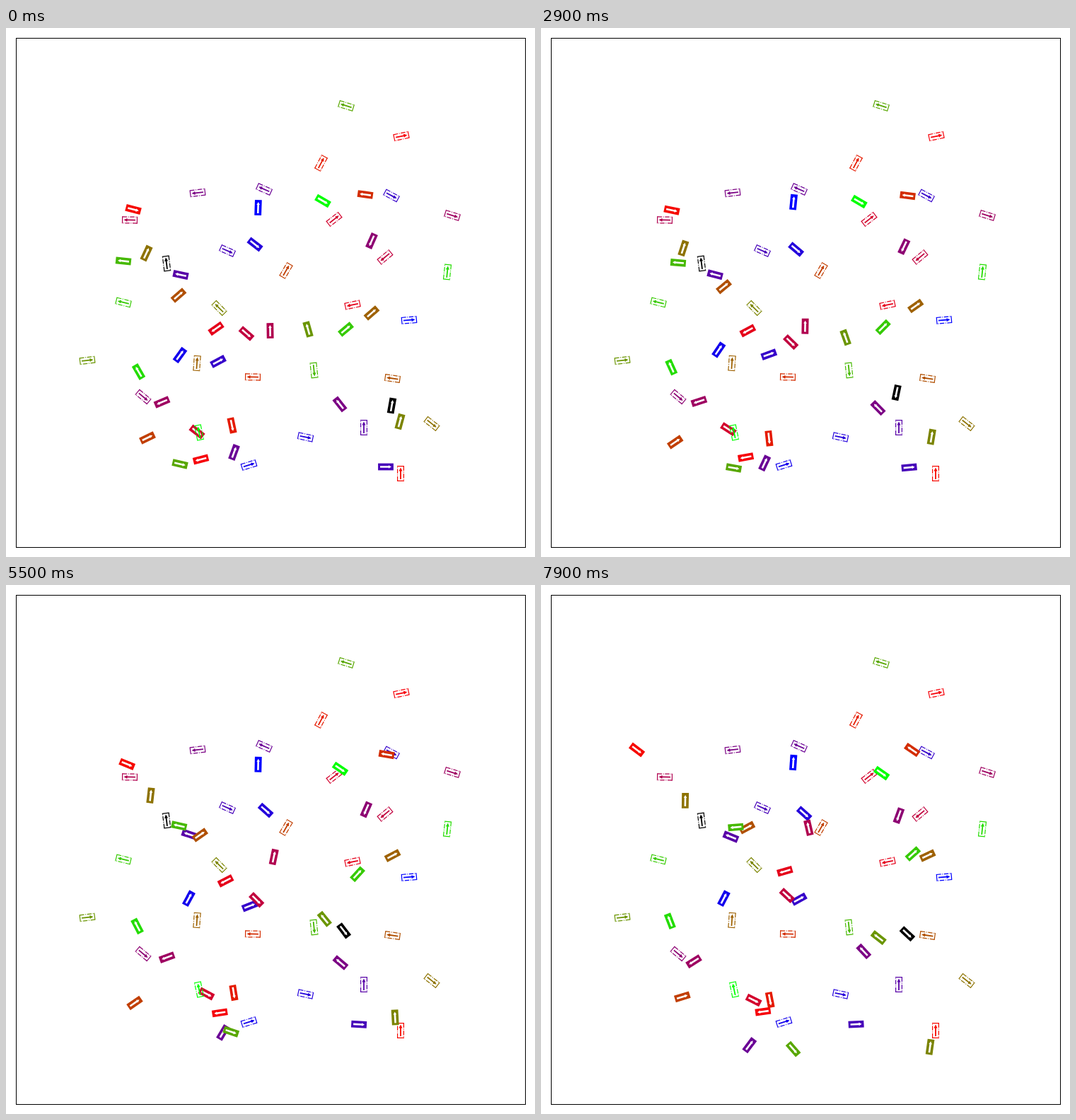
Write an HTML page that moves like this. It is 748x748 px and loops after 8000 ms.

```html
<!DOCTYPE html>
<html lang="en">
<head>
<meta charset="utf-8">
<title>Parking cars</title>
<style>
  html, body { margin: 0; width: 100%; height: 100%; overflow: hidden; background: #fff; }
  svg { display: block; width: 100vw; height: 100vh; }
  .body { fill: currentColor; }
  .arrow { fill: #fff; }
  .goal path { stroke: currentColor; stroke-width: 1.2; }
  .goal .sides { stroke-dasharray: 6.4 1.6 1 1.6; }
  .goal .arrow { fill: currentColor; stroke: none; }
</style>
</head>
<body>
<svg viewBox="0 0 748 748">
  <defs>
    <g id="car" class="car">
      <path class="body" d="M-10.9-4.9h21.8v9.8h-21.8z"/>
      <path class="arrow" d="M-8-1.3H4V-2.3L8 0L4 2.3V1.3H-8Z"/>
    </g>
    <g id="goal" class="goal">
      <path class="ends" d="M-10.4-5v10M10.4-5v10"/>
      <path class="sides" d="M-10.4-4.4h20.8M10.4 4.4h-20.8"/>
      <path class="arrow" d="M-8-.9H3.5V-2.5L8.5 0L3.5 2.5V.9H-8Z"/>
    </g>
  </defs>
  <rect x="14.5" y="14.5" width="720" height="720" fill="#fff" stroke="#000"/>
</svg>
<script>
const LOOP = 8000, STEP = 100, STEPS = 78, BLACK = -1;
const stage = document.querySelector('svg');
const cars = [];

// Blue through red to green.
function paint(hue) {
  if (hue === BLACK) return '#000';
  const v = hue / 14.5;
  const [r, g, b] = [1 - Math.abs(v - 1), v - 1, 1 - v].map(c => Math.round(255 * Math.max(0, c)));
  return `rgb(${r},${g},${b})`;
}

function put(kind, hue) {
  const node = document.createElementNS('http://www.w3.org/2000/svg', 'use');
  node.setAttribute('href', '#' + kind);
  node.setAttribute('color', paint(hue));
  return stage.appendChild(node);
}

function place(node, [x, y, heading]) {
  node.setAttribute('transform', `translate(${x.toFixed(2)} ${y.toFixed(2)}) rotate(${heading.toFixed(2)})`);
}

// Poses are [x, y, heading]. Each leg is an arc [travel, turn]; the legs share the loop equally.
function car(hue, goal, start, ...legs) {
  cars.push({ node: put('car', hue), start, legs });
  place(put('goal', hue), goal);
}

// Steer along the part u of an arc; negative travel is reverse gear.
function drive([x, y, heading], [travel, turn], u) {
  const half = turn * u * Math.PI / 360;
  const chord = travel * u * (half ? Math.sin(half) / half : 1);
  const course = heading * Math.PI / 180 + half;
  return [x + chord * Math.cos(course), y + chord * Math.sin(course), heading + turn * u];
}

function pose({ start, legs }, progress) {
  return legs.reduce((at, leg, i) =>
    drive(at, leg, Math.min(1, Math.max(0, progress * legs.length - i))), start);
}

car(BLACK, [227, 333, -97], [545.5, 534, 280], [18, -37], [28, -60], [28, -93], [-13, -55],
  [-18, 15], [-17, 5], [16, -75], [33, 63]);
car(0, [570, 413, -5], [356.5, 254, -88], [8.5, 4], [-8.5, -5], [3, 3]);
car(1, [343.5, 618, -17], [246, 462.5, -54], [8, -1.5], [15, -6], [0, -1]);
car(2, [423.5, 578.5, 12], [352, 306, 38], [15.5, 3], [11, 1]);
car(3, [545, 237, 28], [300, 471.5, -28], [34, 11], [36.5, -12]);
car(4, [313, 315, 24], [537, 620.5, 0], [-15, -6], [-18.5, 10], [-58, -7]);
car(5, [506, 565, -90], [247, 349, 192], [2, 2], [-14, 4], [-10.5, 4]);
car(6, [365, 228, 204], [322.5, 600, -70], [-23, 7], [-35, 10]);
car(7, [271, 233, 173], [472, 532, 232], [-7, -6], [3, -6], [25, 7]);
car(8, [194, 521.5, 40], [517, 301, 114], [12.5, 2], [15, -6]);
car(9, [631, 265, 17], [220.5, 529, 157], [-2.6, 5], [-6, -1], [14, -13]);
car(10, [175, 271.5, 181], [373.5, 428, -91], [3.5, 1], [37, 14], [45, -27]);
car(11, [536, 324, 140], [340, 432, 41], [25, 5], [-14.5, -3]);
car(12, [464, 270.5, -38], [270, 571, 38], [-8, -5], [21.5, -5], [21, -1]);
car(13, [490, 391.5, 168], [297, 425, 145], [7, 7], [-19, 0], [-40, 12]);
car(14, [559, 153, -12], [275.5, 610, 166], [-20, 5], [-19, 1]);
car(15, [558, 630, -90], [180, 256.5, 15], [6, -4], [-12, 10], [-44.5, 16]);
car(16, [445.5, 191, -62], [319.5, 562, 78], [19, 6], [-5, -3], [11, -2]);
car(17, [349, 493.5, 181], [508, 235.5, 188], [-6, 0], [-10.5, -1.5], [-18, 4], [19, 24]);
car(18, [396, 343, -60], [200, 579.5, -26], [-11, -8], [-12, -2], [21.5, 19]);
car(19, [546.5, 495.5, 188], [244, 378, -41], [26.5, 2], [32.5, 11]);
car(20, [270, 474, -86], [517, 403, -41], [14.5, 5], [21.5, 8], [0, 3]);
car(21, [602, 559.5, 38], [198.5, 318.5, -65], [6.5, -6], [16, -12], [-8, -6]);
car(22, [301.5, 396, 225], [557, 556.5, -75], [-13, -3], [-21, -6], [-28, -12], [-35.5, 14]);
car(23, [115, 470, -7], [427, 426, 254], [-9, -2], [-40, -20], [-41, -14]);
car(24, [481, 110, 197], [246, 616.5, 13], [14.5, -1], [29, -4], [39.5, 14], [37, 27]);
car(25, [435.5, 484, 84], [166, 329.5, 186], [-24, -2], [-53, 10], [-33.5, -19]);
car(26, [166, 388, 194], [480.5, 426, -40], [3, -5], [17.5, -3], [44, 6]);
car(27, [624, 345, -84], [187.5, 486, 240], [7.5, 6], [-4, -4], [8.5, 7]);
car(29, [273, 572, 258], [448, 244.5, 30], [0, 0], [28, 4], [12, 1]);

function draw() {
  const step = Math.max(0, Math.floor(performance.now() % LOOP / STEP) - 1);
  for (const item of cars) place(item.node, pose(item, step / STEPS));
  requestAnimationFrame(draw);
}
draw();
</script>
</body>
</html>
```
